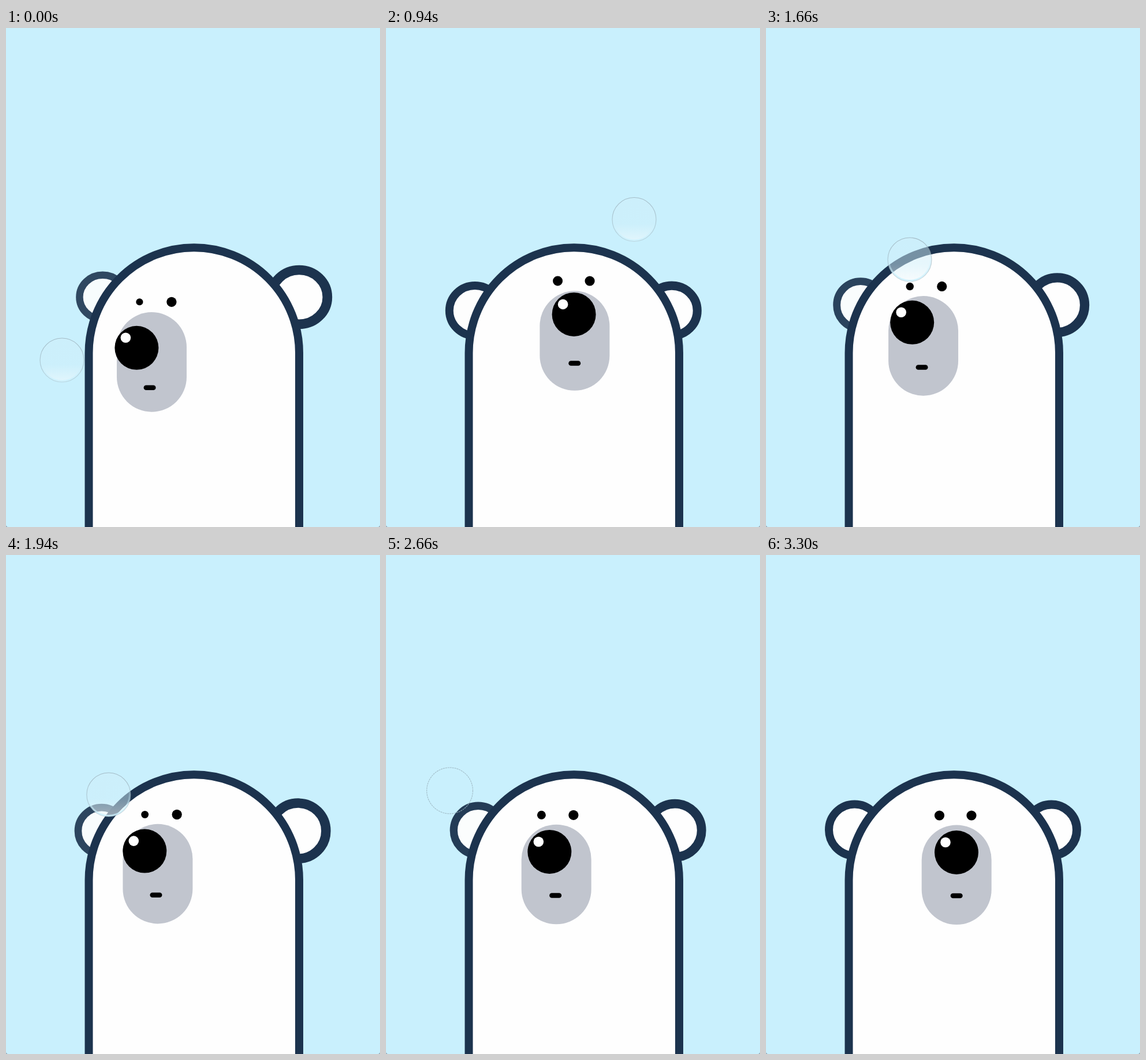
These frames come from a looping animation (648x864 px, 3.58 s). An HTML page:

```html
<!DOCTYPE html>
<html lang="en">
<head>
<meta charset="utf-8">
<title>Bear and bubble</title>
<style>
  html, body { margin: 0; width: 100%; height: 100%; overflow: hidden; background: #c9f0fd; }
  svg { display: block; width: 100%; height: 100%; }
</style>
</head>
<body>
<svg viewBox="0 0 648 864">
  <defs>
    <linearGradient id="film" x1="0" y1="0" x2="0" y2="1">
      <stop offset="0" stop-color="#cfeef9" stop-opacity=".5"/>
      <stop offset=".6" stop-color="#cfeffa" stop-opacity=".5"/>
      <stop offset="1" stop-color="#f5fafc" stop-opacity=".6"/>
    </linearGradient>
    <linearGradient id="edge" x1="0" y1="0" x2="0" y2="1">
      <stop offset="0" stop-color="#8fa0aa" stop-opacity=".65"/>
      <stop offset="1" stop-color="#9fb4be" stop-opacity=".45"/>
    </linearGradient>
    <linearGradient id="glow" x1="0" y1="0" x2="0" y2="1">
      <stop offset=".3" stop-color="#c9f0fd" stop-opacity="0"/>
      <stop offset="1" stop-color="#c9f0fd" stop-opacity=".8"/>
    </linearGradient>
  </defs>
  <rect width="648" height="864" fill="#c9f0fd"/>
  <g fill="#fefefe" stroke="#1c334e">
    <ellipse id="earL"/>
    <ellipse id="earR"/>
    <path d="M143.5 880V562.5a182.25 182.25 0 0 1 364.5 0V880" stroke-width="14"/>
  </g>
  <rect id="muzzle" x="269.7" y="467.4" width="121" height="172.6" rx="60.5" fill="#c1c5ce"/>
  <g id="eyes">
    <circle id="eyeL" cx="300.5" cy="451"/>
    <circle id="eyeR" cx="356" cy="451"/>
  </g>
  <g id="nose">
    <circle cx="330" cy="515" r="38"/>
    <circle cx="311" cy="497.5" r="8.8" fill="#fefefe"/>
  </g>
  <rect id="mouth" x="319.7" y="585.8" width="21" height="8.5" rx="4.25"/>
  <g id="bubble">
    <circle r="38" fill="url(#film)"/>
    <circle r="36.5" fill="none" stroke="url(#glow)" stroke-width="3"/>
    <circle r="38" fill="none" stroke="url(#edge)" stroke-width="1.2"/>
  </g>
  <circle id="ring" fill="none" stroke="#9db6c1" stroke-width="1.2" stroke-dasharray="3 1"/>
  <path d="M0 860Q0 864 4 864H0ZM648 860Q648 864 644 864H648Z" fill="#8b98a8"/>
</svg>
<script>
const LOOP = 3580, STEP = 20;
const RELEASE = 2500, SETTLE = 700;
const POP = 2640, POP_LEN = 60;

// the bubble floats through these points, smoothly in time
const path = [
  { t: 0, x: 97, y: 575 },
  { t: 400, x: 538, y: 499 },
  { t: 560, x: 515, y: 372 },
  { t: 940, x: 430, y: 331.5 },
  { t: 1100, x: 300, y: 414 },
  { t: 1660, x: 249, y: 401 },
  { t: 2200, x: 116, y: 427 },
  { t: POP, x: 110.5, y: 408 }
];

const el = {};
document.querySelectorAll('svg [id]').forEach(n => el[n.id] = n);
const set = (node, attrs) => {
  for (const k in attrs) node.setAttribute(k, attrs[k]);
};
const shift = (node, x, y) => set(node, { transform: `translate(${x} ${y})` });
const clamp = u => Math.min(1, Math.max(0, u));

// Catmull-Rom spline over time
function bubbleAt(t) {
  const last = path.length - 1;
  const at = i => path[Math.min(last, Math.max(0, i))];
  let i = 0;
  while (i < last - 1 && t >= path[i + 1].t) i++;
  const a = path[i], b = path[i + 1], d = b.t - a.t;
  const u = clamp((t - a.t) / d), v = 1 - u;
  const speed = (j, k) => (at(j + 1)[k] - at(j - 1)[k]) / (at(j + 1).t - at(j - 1).t);
  const mix = k => v * v * (1 + 2 * u) * a[k] + u * u * (3 - 2 * u) * b[k]
    + u * v * d * (v * speed(i, k) - u * speed(i + 1, k));
  return { x: mix('x'), y: mix('y') };
}

// the head turns with the bubble, less and less towards its limits
function gazeAt(t) {
  const p = bubbleAt(Math.min(t, RELEASE));
  const hold = (1 - clamp((t - RELEASE) / SETTLE)) ** 3;
  const x = Math.max(0.4 * (p.x - 441), 0.172 * (p.x - 249) - 77.5);
  const dy = p.y - 427;
  const y = dy < 0 ? 0.2 * dy : Math.min(0.44 * dy, 25.5 + 0.09 * dy);
  return { x: x * hold, y: y * hold };
}

function drawEar(node, side, edge, turn, lift, squash, w, alpha) {
  const rx = 51.5 + turn, ry = rx - squash, line = w + turn * 0.3;
  set(node, {
    cx: edge - side * rx, cy: 476 + lift,
    rx: rx - line / 2, ry: ry - line / 2,
    'stroke-width': line, opacity: alpha
  });
}

function drawBear({ x, y }) {
  const left = x < 0, up = y < 0;
  shift(el.nose, x, y);
  shift(el.muzzle, x * 0.75, y * 0.635);
  shift(el.eyes, x * 0.667, y * (up ? 0.68 : 0.6));
  shift(el.mouth, x * 0.783, y * (up ? 0.5 : 0.84));
  set(el.eyeL, { r: 8.6 + Math.min(0, x) * 0.0245 });
  set(el.eyeR, { r: 8.6 - Math.max(0, x) * 0.02 });

  const slide = x * (left ? 0.185 : 0.29);
  const lift = -y * (up ? 0.7 : 0.26);
  const squash = Math.abs(y) * 0.05;
  drawEar(el.earL, -1, 102 - slide, x * 0.05, lift, squash, 14, 1 + Math.min(0, x) * 0.0011);
  drawEar(el.earR, 1, 546 - slide, -x * (left ? 0.055 : 0.11), lift, squash, 15, 1);
}

function drawBubble(t) {
  const { x, y } = bubbleAt(t);
  const u = (t - POP) / POP_LEN;
  shift(el.bubble, x, y);
  set(el.bubble, { opacity: u < 0 ? 1 : 0 });
  set(el.ring, {
    cx: x, cy: y,
    r: 38 + 30 * Math.max(0, u) ** 2.5,
    opacity: u >= 0 && u < 1 ? 1 - u * 0.6 : 0
  });
}

function render(t) {
  drawBear(gazeAt(t));
  drawBubble(t);
}

const start = performance.now();
function tick() {
  const t = (performance.now() - start) % LOOP;
  render(Math.floor(t / STEP) * STEP);
  requestAnimationFrame(tick);
}
render(0);
requestAnimationFrame(tick);
</script>
</body>
</html>
```
